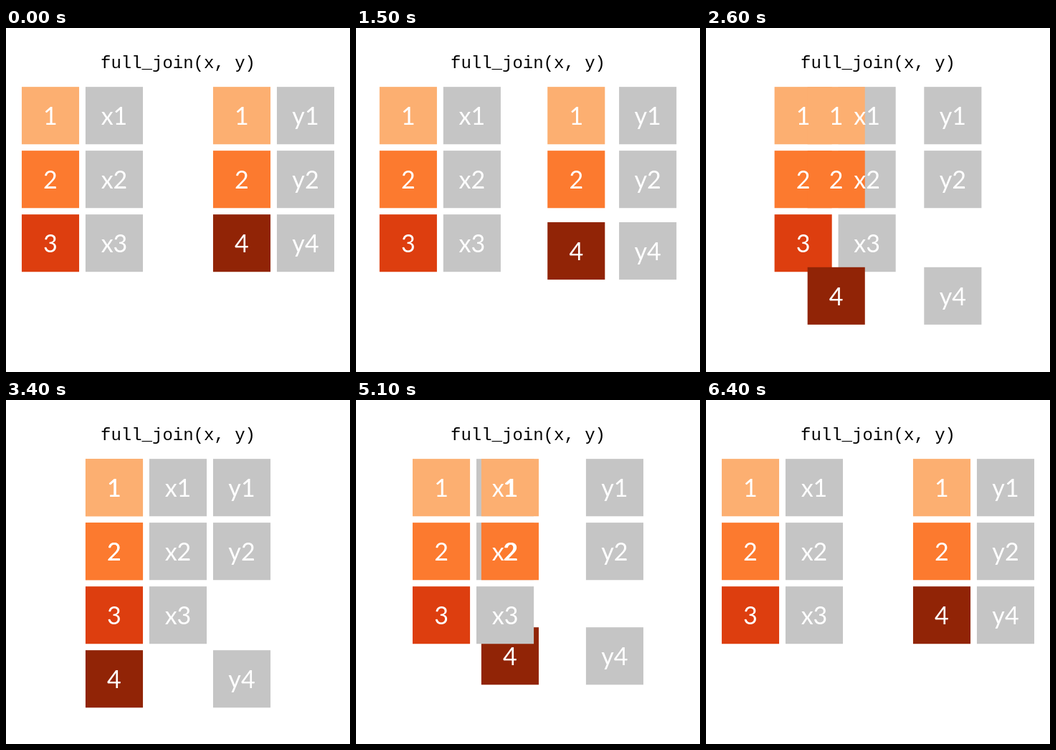
These frames come from a looping animation (480 px wide and 480 px high, 6500 ms). An HTML page with a canvas:

```html
<!DOCTYPE html>
<html lang="en">
<head>
<meta charset="utf-8">
<title>full_join(x, y)</title>
<style>
  html, body { margin: 0; width: 100%; height: 100%; overflow: hidden; background: #fff; }
  canvas { display: block; width: 480px; height: 480px; }
</style>
</head>
<body>
<canvas id="stage" width="480" height="480"></canvas>
<script>
const ctx = document.getElementById('stage').getContext('2d');

const LOOP = 6500, STEP = 100, MOVE = 2200;
const JOIN_AT = 1000, SPLIT_AT = 4200;
const PITCH = 89, SIZE = 80.1, LEFT = 62, TOP = 122.2;
const GREY = '#c5c5c5';
const KEY_COLORS = { 1: '#fcaf71', 2: '#fc7a2f', 3: '#dd3e0f', 4: '#912406' };

// Columns and rows are in tile units, for the separate and the joined tables.
const tile = (label, fromCol, toCol, fromRow, toRow = fromRow) =>
  ({ label, fromCol, toCol, fromRow, toRow, color: KEY_COLORS[label] || GREY });

const xKeys = [1, 2, 3].map((n, row) => tile(`${n}`, 0, 1, row));
const xValues = [1, 2, 3].map((n, row) => tile(`x${n}`, 1, 2, row));
const yShared = [1, 2].map((n, row) => tile(`${n}`, 3, 1, row));
const yOnly = tile('4', 3, 1, 2, 3);
const yValues = [tile('y1', 4, 3, 0), tile('y2', 4, 3, 1), tile('y4', 4, 3, 2, 3)];

// The stacking order differs between joining and splitting.
const joinOrder = [...xKeys, ...xValues, ...yShared, yOnly, ...yValues];
const splitOrder = [...xKeys, yOnly, ...xValues, ...yValues, ...yShared];

const ease = t => (1 - Math.cos(Math.PI * Math.min(1, Math.max(0, t)))) / 2;
const mix = (a, b, p) => a + (b - a) * p;

function draw(time) {
  const p = ease((time - JOIN_AT) / MOVE) - ease((time - SPLIT_AT) / MOVE);
  const tiles = (time < SPLIT_AT ? joinOrder : splitOrder).map(t => ({
    ...t,
    x: LEFT + PITCH * mix(t.fromCol, t.toCol, p),
    y: TOP + PITCH * mix(t.fromRow, t.toRow, p)
  }));

  ctx.fillStyle = '#fff';
  ctx.fillRect(0, 0, 480, 480);

  for (const { x, y, color } of tiles) {
    ctx.fillStyle = color;
    ctx.fillRect(x - SIZE / 2, y - SIZE / 2, SIZE, SIZE);
  }

  ctx.textAlign = 'center';
  ctx.fillStyle = '#fff';
  ctx.font = '34.1px Lato, sans-serif';
  for (const { x, y, label } of tiles) ctx.fillText(label, x, y + 12.8);

  ctx.fillStyle = '#000';
  ctx.font = '24px "Courier New", "Liberation Mono", monospace';
  ctx.fillText('full_join(x, y)', 240, 56);
}

const start = performance.now();
function frame() {
  const time = (performance.now() - start) % LOOP;
  draw(Math.floor(time / STEP) * STEP);
  requestAnimationFrame(frame);
}
frame();
</script>
</body>
</html>
```
